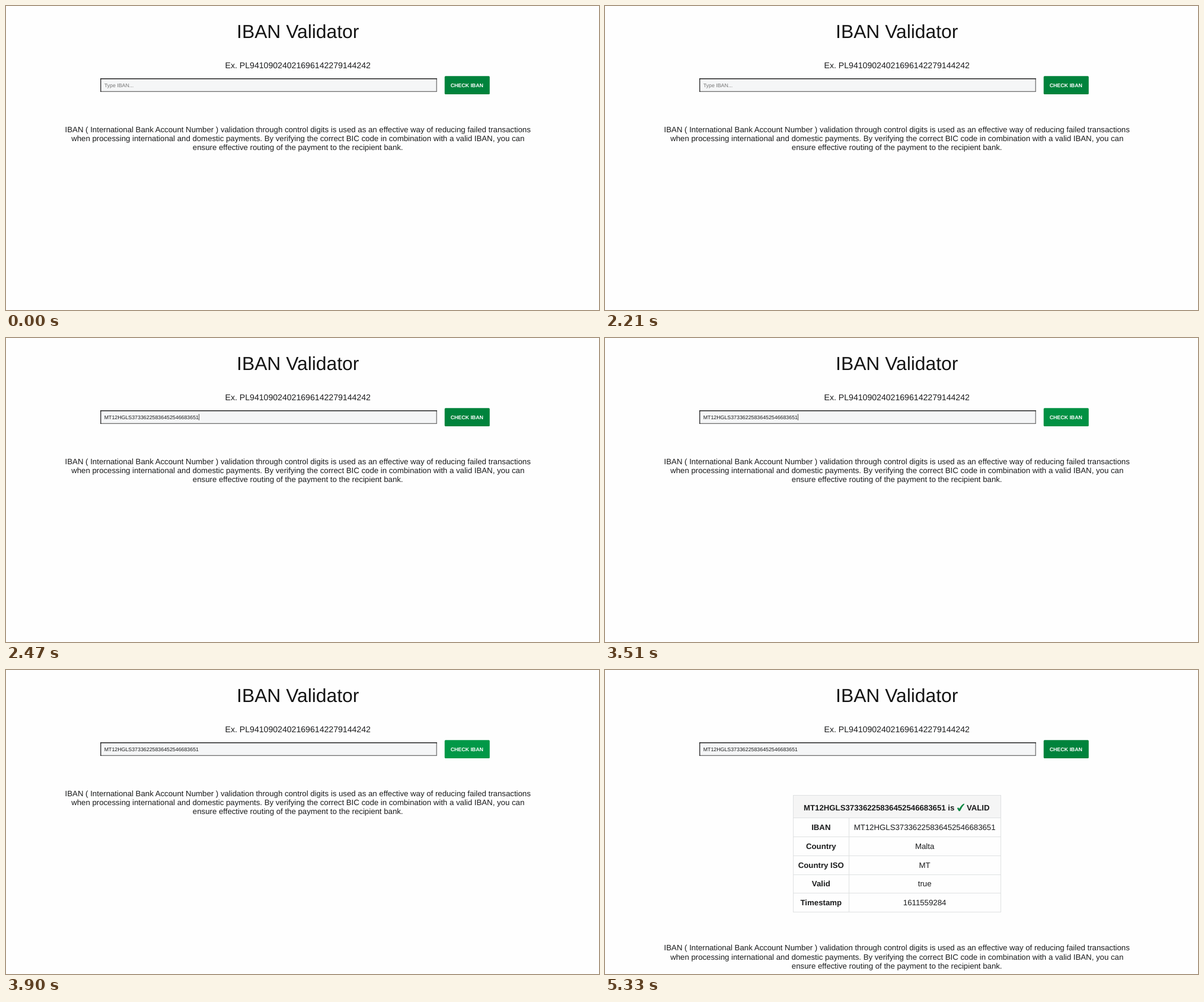
An HTML page with a canvas for the animation above (6760 ms loop, 1000 by 513 pixels).

```html
<!DOCTYPE html>
<html lang="en">
<head>
<meta charset="utf-8">
<title>IBAN Validator</title>
<style>
  html, body { margin: 0; width: 100%; height: 100%; overflow: hidden; background: #fefefe; }
  canvas { display: block; width: 1000px; height: 513px; }
</style>
</head>
<body>
<canvas id="stage"></canvas>
<script>
const WIDTH = 1000, HEIGHT = 513, LOOP = 6760, TICK = 130;
const FAMILY = '"Liberation Sans", Arial, sans-serif';
const INK = '#1b1c1d';
const BODY_SIZE = 13.22, CONTROL_SIZE = 8.82;
const CENTER = 492.2, INPUT_X = 165.7;
const IBAN = 'MT12HGLS37336225836452546683651';

const INTRO = [
  'IBAN ( International Bank Account Number ) validation through control digits is used as an effective way of reducing failed transactions',
  'when processing international and domestic payments. By verifying the correct BIC code in combination with a valid IBAN, you can',
  'ensure effective routing of the payment to the recipient bank.'
];
const ROWS = [
  ['IBAN', IBAN],
  ['Country', 'Malta'],
  ['Country ISO', 'MT'],
  ['Valid', 'true'],
  ['Timestamp', '1611559284']
];

// Moments of the interaction, in ms.
const FOCUS = 1690, PASTE = 2470, HOVER = 3380, CLICK = 3900, RESULT = 4160, LEAVE = 5330;
const CARET_ON = [[FOCUS, 2210], [PASTE, 2990], [3510, CLICK]];

const canvas = document.getElementById('stage');
const ratio = window.devicePixelRatio || 1;
canvas.width = Math.round(WIDTH * ratio);
canvas.height = Math.round(HEIGHT * ratio);
const ctx = canvas.getContext('2d');
ctx.scale(ratio, ratio);
ctx.textRendering = 'geometricPrecision';

function rect(x, y, w, h, color) {
  ctx.fillStyle = color;
  ctx.fillRect(x, y, w, h);
}

function text(str, x, y, { size = BODY_SIZE, color = INK, align = 'center', bold = false } = {}) {
  ctx.font = `${bold ? 'bold ' : ''}${size}px ${FAMILY}`;
  ctx.textAlign = align;
  ctx.fillStyle = color;
  ctx.fillText(str, x, y);
}

function drawInput(t) {
  const x = 159.2, y = 122, w = 567.6, h = 23, edge = 1.3;
  rect(x, y, w, h, '#707070');
  rect(x, y, w, 1.6, '#262626');
  rect(x, y, edge, h, '#262626');
  rect(x + edge, y + 1.6, w - 2 * edge, h - 1.6 - edge, '#f5f6f7');

  const filled = t >= PASTE;
  const style = { size: CONTROL_SIZE, align: 'left', color: filled ? INK : '#757575' };
  text(filled ? IBAN : 'Type IBAN...', INPUT_X, 136.7, style);
  if (CARET_ON.some(([from, to]) => t >= from && t < to)) {
    const offset = filled ? ctx.measureText(IBAN).width : 0;
    rect(INPUT_X + offset, 128.3, 0.8, 10.6, '#222');
  }
}

function drawButton(t) {
  const glow = t < HOVER || t >= LEAVE ? 0 : Math.min(1, (t - HOVER + TICK) / (3 * TICK));
  const mix = (a, b) => Math.round(a + (b - a) * glow);
  ctx.fillStyle = `rgb(${mix(0, 2)}, ${mix(131, 152)}, ${mix(60, 71)})`;
  ctx.beginPath();
  ctx.roundRect(739.7, 118.3, 76, 30.8, 1.6);
  ctx.fill();
  text('CHECK IBAN', 777.3, 136.7, { size: CONTROL_SIZE, color: '#fff', bold: true });
}

function drawCheckMark() {
  ctx.fillStyle = '#078842';
  ctx.beginPath();
  ctx.moveTo(593.8, 233.2);
  ctx.quadraticCurveTo(596, 231.2, 597.6, 234);
  ctx.quadraticCurveTo(601, 227.6, 605.2, 225.6);
  ctx.lineTo(606.2, 226.6);
  ctx.quadraticCurveTo(601.8, 231, 599, 237.6);
  ctx.quadraticCurveTo(597.4, 239, 596.2, 237.6);
  ctx.closePath();
  ctx.fill();
}

function drawTable() {
  const left = 317, right = 667, divider = 411, top = 211, firstRow = 249.3, rowHeight = 31.78;
  const bottom = firstRow + rowHeight * ROWS.length;
  const line = '#dfe1e2';
  rect(left, top, right - left, firstRow - top, '#f5f5f5');
  rect(left, top, right - left + 1, 1, line);
  for (let i = 0; i <= ROWS.length; i++) {
    rect(left, Math.round(firstRow + i * rowHeight), right - left + 1, 1, line);
  }
  rect(left, top, 1, bottom - top, line);
  rect(right, top, 1, bottom - top, line);
  rect(divider, firstRow, 1, bottom - firstRow, line);

  text(`${IBAN} is`, 335, 236.9, { bold: true, align: 'left' });
  drawCheckMark();
  text('VALID', 609.9, 236.9, { bold: true, align: 'left' });
  ROWS.forEach(([label, value], i) => {
    const y = 270 + i * rowHeight;
    text(label, 364.3, y, { bold: true });
    text(value, 539.1, y);
  });
}

function draw(t) {
  rect(0, 0, WIDTH, HEIGHT, '#fefefe');
  text('IBAN Validator', CENTER, 53.5, { size: 31.8, color: '#141414' });
  text('Ex. PL94109024021696142279144242', CENTER, 105, { size: 14.1 });
  drawInput(t);
  drawButton(t);
  const showResult = t >= RESULT;
  if (showResult) drawTable();
  const introY = showResult ? 473.3 : 212.7;
  INTRO.forEach((str, i) => text(str, CENTER, introY + i * 15.25));
}

const start = performance.now();
function frame() {
  const t = (performance.now() - start) % LOOP;
  draw(Math.floor(t / TICK) * TICK);
  requestAnimationFrame(frame);
}
frame();
</script>
</body>
</html>
```
